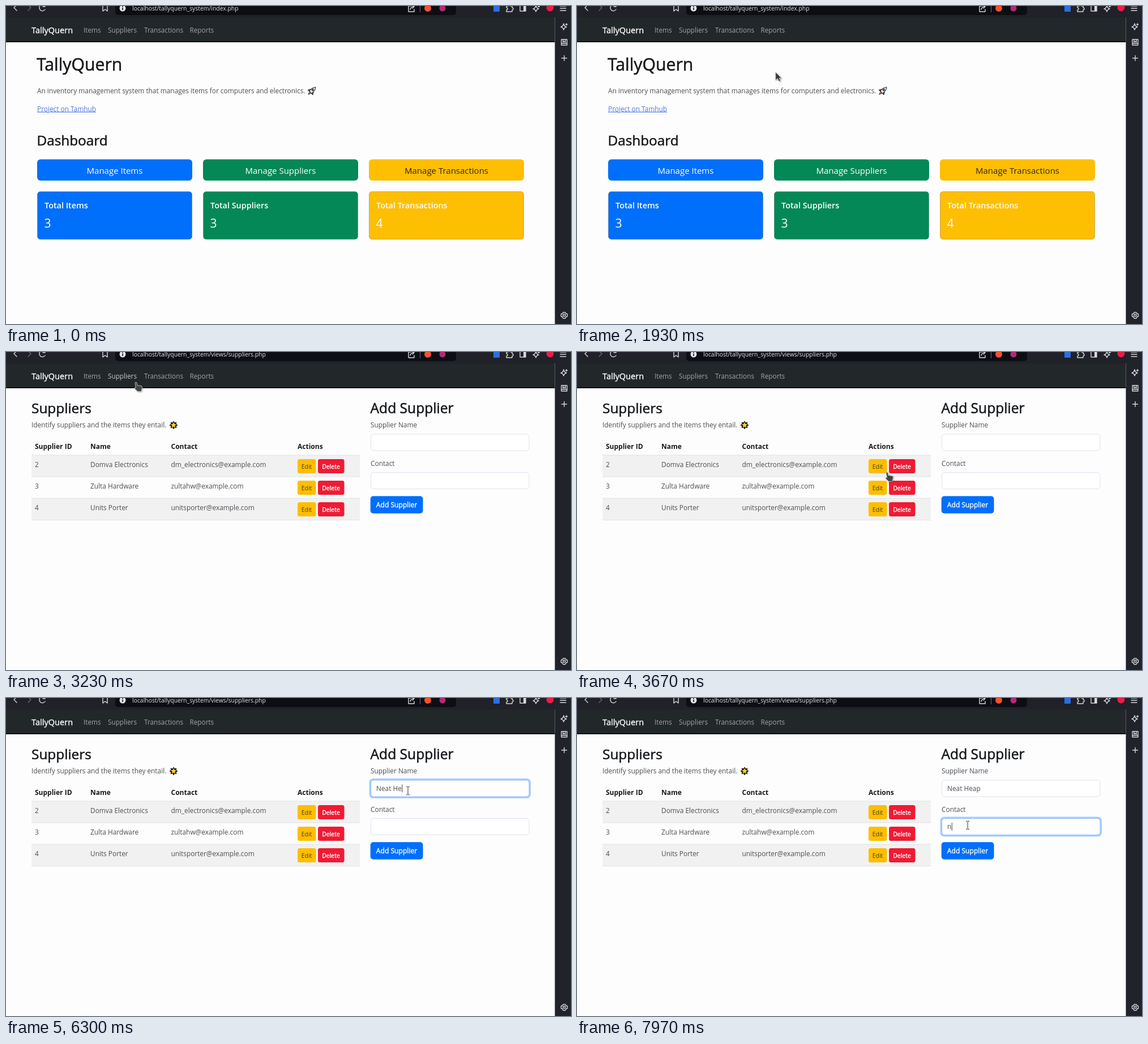
Recreate the animation shown at these times as an HTML page. Size 998 px wide and 561 px high, loop 8 s.

```html
<!DOCTYPE html>
<html lang="en">
<head>
<meta charset="utf-8">
<title>TallyQuern</title>
<style>
  html, body { margin: 0; height: 100%; overflow: hidden; background: #fdfdfd; }
  svg { display: block; width: 100vw; height: 100vh; }
  text { font-family: "Open Sans", "Noto Sans", sans-serif; white-space: pre; }
  .icon { fill: none; stroke: #d6d7dc; stroke-width: 1.4; stroke-linecap: round; stroke-linejoin: round; }
  .heading { stroke: #16191c; stroke-width: .55; }
  .medium { stroke: #fff; stroke-width: .35; }
</style>
</head>
<body>
<svg id="stage" viewBox="0 0 998 561"></svg>
<script>
const LOOP = 8000;
const PAGE_SWITCH = 3100;
const NAME_FOCUS = 4200;
const CONTACT_FOCUS = 6980;
const INK = '#16191c', BODY = '#4b4e52';
const BLUE = '#006ffb', GREEN = '#048857', YELLOW = '#febe02', RED = '#f01a34';

const text = (x, y, size, string, fill = BODY, extra = '') =>
  `<text x="${x}" y="${y}" font-size="${size}" fill="${fill}" ${extra}>${string}</text>`;
const rect = (x, y, w, h, fill, r = 0, extra = '') =>
  `<rect x="${x}" y="${y}" width="${w}" height="${h}" rx="${r}" fill="${fill}" ${extra}/>`;
const circle = (x, y, r, fill) => `<circle cx="${x}" cy="${y}" r="${r}" fill="${fill}"/>`;
const icon = (x, y, d, extra = '') =>
  `<path class="icon" transform="translate(${x} ${y})" d="${d}" ${extra}/>`;
const heading = (x, y, size, string) => text(x, y, size, string, INK, 'class="heading"');
const centered = 'text-anchor="middle"';

const SPARKLE = 'M-1-5Q0 0 4 1Q0 2-1 6Q-2 2-6 1Q-2 0-1-5ZM4-5V-2M2.5-3.5H5.5';

function browserChrome() {
  return rect(0, 0, 998, 20, '#202129') + rect(969.5, 0, 28.5, 561, '#21232b') +
    rect(193, -10, 602, 26, '#0d0e13', 5) +
    icon(17, 3, 'M2-5L-3 0L2 5') +
    icon(41, 3, 'M-2-5L3 0L-2 5', 'style="stroke:#656770"') +
    icon(64, 3, 'M4-4A5.5 5.5 0 1 0 5 3M5-6V-2H1') +
    icon(175, 4, 'M-4-7H4V5L0 2L-4 5Z') +
    circle(206, 4, 5.5, '#e4e5e8') + rect(205.2, 3, 1.6, 4, '#0d0e13') + rect(205.2, 0, 1.6, 1.8, '#0d0e13') +
    icon(716, 4, 'M-1-4H-5V6H5V2M-2 2Q-1-3 5-3M2-6L5-3L2 0') +
    rect(731, -2, 1, 13, '#6b6d74') +
    circle(745, 4, 6, '#f4512c') + circle(771, 4, 5.5, '#b22978') +
    rect(861, -2, 11, 12, '#2b6fe0', 1) +
    icon(889, 4, 'M-5-4H-2A2 2 0 1 1 2-4H5V-1A2 2 0 1 1 5 3V6H-5V3A2 2 0 1 0-5-1Z') +
    icon(913, 4, 'M-5-6H5V5H-5Z') + rect(914, -2, 4, 11, '#d6d7dc') +
    icon(937, 4, SPARKLE) + circle(961, 3, 6.5, '#e91d49') +
    icon(984, 4, 'M-5-4H5M-5 0H5M-5 4H5') +
    icon(986, 36, SPARKLE) +
    icon(986, 64, 'M-5-5H5V5H-5ZM-5 2H5M-2-5V0L0-1.5L2 0V-5') +
    icon(986, 92, 'M-4.5 0H4.5M0-4.5V4.5') +
    icon(986, 545.5, 'M-2-5H2L3-3L5.5-2V2L3 3L2 5.5H-2L-3 3L-5.5 2V-2L-3-3ZM2 0A2 2 0 1 1-2 0A2 2 0 1 1 2 0') +
    text(223, 8, 10.4, '', '#e6e6e8', 'id="address"');
}

function navBar() {
  const links = [[137, 'Items'], [180, 'Suppliers'], [244, 'Transactions'], [324.5, 'Reports']];
  return rect(0, 20, 969.5, 43, '#22272a') + rect(0, 62, 969.5, 2, '#101315') +
    text(45, 48, 14.6, 'TallyQuern', '#fff', 'class="medium"') +
    links.map(([x, label]) => text(x, 46.5, 11.75, label, '#a3a5a7', `id="nav${label}"`)).join('');
}

function rocket(x, y) {
  return `<g transform="translate(${x} ${y}) rotate(45)" stroke="#25282c" stroke-width="1">
    <path d="M-2 4L0 9L2 4Z" fill="#f5a623"/>
    <path d="M-3-1L-6 4L-3 4ZM3-1L6 4L3 4Z" fill="#d8343c"/>
    <path d="M0-9Q4-5 3 4H-3Q-4-5 0-9Z" fill="#dfe6ee"/>
    <circle cy="-2" r="1.6" fill="#3f9bd8"/></g>`;
}

function star(x, y) {
  const points = (n, outer, inner) => Array.from({ length: 2 * n }, (_, i) => {
    const a = i * Math.PI / n - Math.PI / 2, r = i % 2 ? inner : outer;
    return `${(r * Math.cos(a)).toFixed(2)},${(r * Math.sin(a)).toFixed(2)}`;
  }).join(' ');
  return `<g transform="translate(${x} ${y})"><polygon points="${points(8, 7.6, 5.2)}" fill="#24241c"/>
    <polygon points="${points(5, 5.2, 2.4)}" fill="#ffd426"/></g>`;
}

function dashboard() {
  const cards = [['Items', 3, BLUE, '#fff'], ['Suppliers', 3, GREEN, '#fff'], ['Transactions', 4, YELLOW, '#332a0c']];
  return heading(54, 114, 30.2, 'TallyQuern') +
    text(55, 153.5, 11.87, 'An inventory management system that manages items for computers and electronics.') +
    rocket(540.5, 149.5) +
    text(55, 185.5, 11.87, 'Project on Tamhub', '#4f77e6', 'text-decoration="underline"') +
    heading(54.5, 246, 24.3, 'Dashboard') +
    cards.map(([name, total, color, label], i) => {
      const x = 55 + 293 * i;
      return rect(x, 270.5, 274, 37.5, color, 6) +
        text(x + 137, 295.5, 15, `Manage ${name}`, label, centered) +
        rect(x + .5, 327.5, 273, 84, color, 5, 'stroke="#000" stroke-opacity=".22"') +
        text(x + 13, 356.5, 14.4, `Total ${name}`, '#fff', 'font-weight="600"') +
        text(x + 12.5, 391, 21, total, '#fff');
    }).join('');
}

const field = (id, y) =>
  rect(641.5, y - 2.5, 285.5, 35, '#a9ccfe', 7, `id="${id}Glow"`) +
  rect(644.5, y + .5, 279.5, 29, '#fff', 5, `id="${id}Box"`) +
  text(654, y + 19, 11.87, '', BODY, `id="${id}Text"`);

function suppliersPage() {
  const columns = [[51, 'Supplier ID'], [149, 'Name'], [291.5, 'Contact'], [515, 'Actions']];
  const rows = [
    [2, 'Domva Electronics', 'dm_electronics@example.com'],
    [3, 'Zulta Hardware', 'zultahw@example.com'],
    [4, 'Units Porter', 'unitsporter@example.com'],
  ];
  return heading(45, 108, 24.4, 'Suppliers') +
    text(45, 133, 11.87, 'Identify suppliers and the items they entail.') + star(296, 129) +
    columns.map(([x, label]) => text(x, 171, 12, label, INK, 'font-weight="700"')).join('') +
    rows.map((cells, i) => {
      const y = 182 + 38 * i;
      return rect(45, y, 580, 38, i % 2 ? '#fdfdfd' : '#f1f1f1') + rect(45, y - .5, 580, 1, '#dee2e6') +
        cells.map((cell, c) => text(columns[c][0], y + 21, 11.87, cell)).join('') +
        rect(515, y + 7, 32.5, 25, YELLOW, 3.5) + text(531, y + 23.7, 10.4, 'Edit', '#4c3d10', centered) +
        rect(551, y + 7, 46.5, 25, RED, 3.5) +
        text(574, y + 23.7, 10.5, 'Delete', '#fff', centered + ' class="medium"');
    }).join('') + rect(45, 296, 580, 1, '#dee2e6') +
    heading(643.5, 108, 24.6, 'Add Supplier') +
    text(644, 133, 11.87, 'Supplier Name') + field('name', 144.5) +
    text(644, 201, 11.87, 'Contact') + field('contact', 212) +
    rect(643.7, 254.3, 92.8, 30.5, BLUE, 5) +
    text(690, 274, 12.1, 'Add Supplier', '#fff', centered + ' class="medium"') +
    rect(0, 0, 1, 14, '#444', 0, 'id="caret"');
}

const BEAM = 'M-3-6.5H-1L0-5.5L1-6.5H3M0-5.5V6.5M-3 7.5H-1L0 6.5L1 7.5H3';
const cursors = `
  <g id="arrow" style="filter:drop-shadow(1.5px 1.5px 1px #0006)">
    <path d="M0 0V14L3.4 11L6 16L8.6 14.8L6.3 10.3H10.5Z" fill="#393939" stroke="#ddd" stroke-width=".8"/></g>
  <g id="hand" style="filter:drop-shadow(1px 1.5px 1px #0005)">
    <path d="M-1.5 1Q0-1 1.7 1L2.4 5.5L9 6.5Q11.5 7.3 11 10L9.5 16.5H3L-2.5 11Q-2.5 9 0 9.5Z" fill="#454545" stroke="#ddd" stroke-width=".8"/></g>
  <g id="beam" fill="none">
    <path d="${BEAM}" stroke="#d4d4d4" stroke-width="3"/>
    <path d="${BEAM}" stroke="#6c6c6c"/></g>`;

const stage = document.getElementById('stage');
stage.innerHTML = rect(0, 0, 998, 561, '#fdfdfd') + browserChrome() + navBar() +
  `<g id="dashboard">${dashboard()}</g><g id="suppliers">${suppliersPage()}</g>` + cursors;
const el = id => document.getElementById(id);
const show = (id, visible) => el(id).style.display = visible ? '' : 'none';

// Pointer path: time, x, y
const path = [
  [1370, 967, 215], [1560, 763, 160], [1930, 351, 117], [2170, 285, 86], [2420, 255, 72],
  [2670, 242, 64], [2900, 207, 42], [3200, 207, 42], [3670, 547, 212], [4000, 690, 172],
  [4180, 711, 164], [5800, 711, 164], [6300, 710, 163], [6630, 710, 163], [6930, 690, 224], [LOOP, 690, 224],
];

function pointerAt(t) {
  const i = path.findIndex(stop => stop[0] > t);
  const [t0, x0, y0] = path[i - 1], [t1, x1, y1] = path[i];
  const k = (t - t0) / (t1 - t0);
  return [x0 + (x1 - x0) * k, y0 + (y1 - y0) * k];
}

const inside = (x, y, left, top, right, bottom) => x >= left && x <= right && y >= top && y <= bottom;

function cursorShape(x, y, onSuppliers) {
  if (inside(x, y, 137, 33, 367, 54)) return 'hand';
  if (!onSuppliers) return 'arrow';
  if (inside(x, y, 644, 145, 924, 174) || inside(x, y, 644, 212, 924, 242)) return 'beam';
  return inside(x, y, 515, 190, 597, 214) ? 'hand' : 'arrow';
}

const inputs = [
  { id: 'name', y: 144.5, from: NAME_FOCUS, to: CONTACT_FOCUS, value: 'Neat Heap',
    keys: [5000, 5180, 5350, 5520, 5700, 5950, 6150, 6400, 6580] },
  { id: 'contact', y: 212, from: CONTACT_FOCUS, to: LOOP, value: 'n', keys: [7790] },
];

function drawInput({ id, y, from, to, value, keys }, t) {
  const focused = t >= from && t < to;
  const typed = keys.filter(key => key <= t);
  const label = el(id + 'Text');
  label.textContent = value.slice(0, typed.length);
  show(id + 'Glow', focused);
  el(id + 'Box').setAttribute('stroke', focused ? '#8fbdfe' : '#dee2ee');
  if (!focused) return;
  const lastInput = typed.length ? typed[typed.length - 1] : from;
  show('caret', (t - lastInput) % 1060 < 530);
  el('caret').setAttribute('x', 654.5 + (typed.length ? label.getComputedTextLength() : 0));
  el('caret').setAttribute('y', y + 8);
}

function draw(t) {
  const onSuppliers = t >= PAGE_SWITCH;
  show('dashboard', !onSuppliers);
  show('suppliers', onSuppliers);
  el('address').textContent = 'localhost/tallyquern_system/' + (onSuppliers ? 'views/suppliers.php' : 'index.php');

  show('caret', false);
  inputs.forEach(input => drawInput(input, t));

  const moving = t >= path[0][0];
  const [x, y] = moving ? pointerAt(t) : [0, 0];
  const shape = moving && cursorShape(x, y, onSuppliers);
  for (const id of ['arrow', 'hand', 'beam']) {
    show(id, id === shape);
    el(id).setAttribute('transform', `translate(${x} ${y})`);
  }
  el('navSuppliers').setAttribute('fill', shape === 'hand' && y < 60 ? '#c8c9ca' : '#a3a5a7');
}

const start = performance.now();
function tick() {
  draw((performance.now() - start) % LOOP);
  requestAnimationFrame(tick);
}
tick();
</script>
</body>
</html>
```
